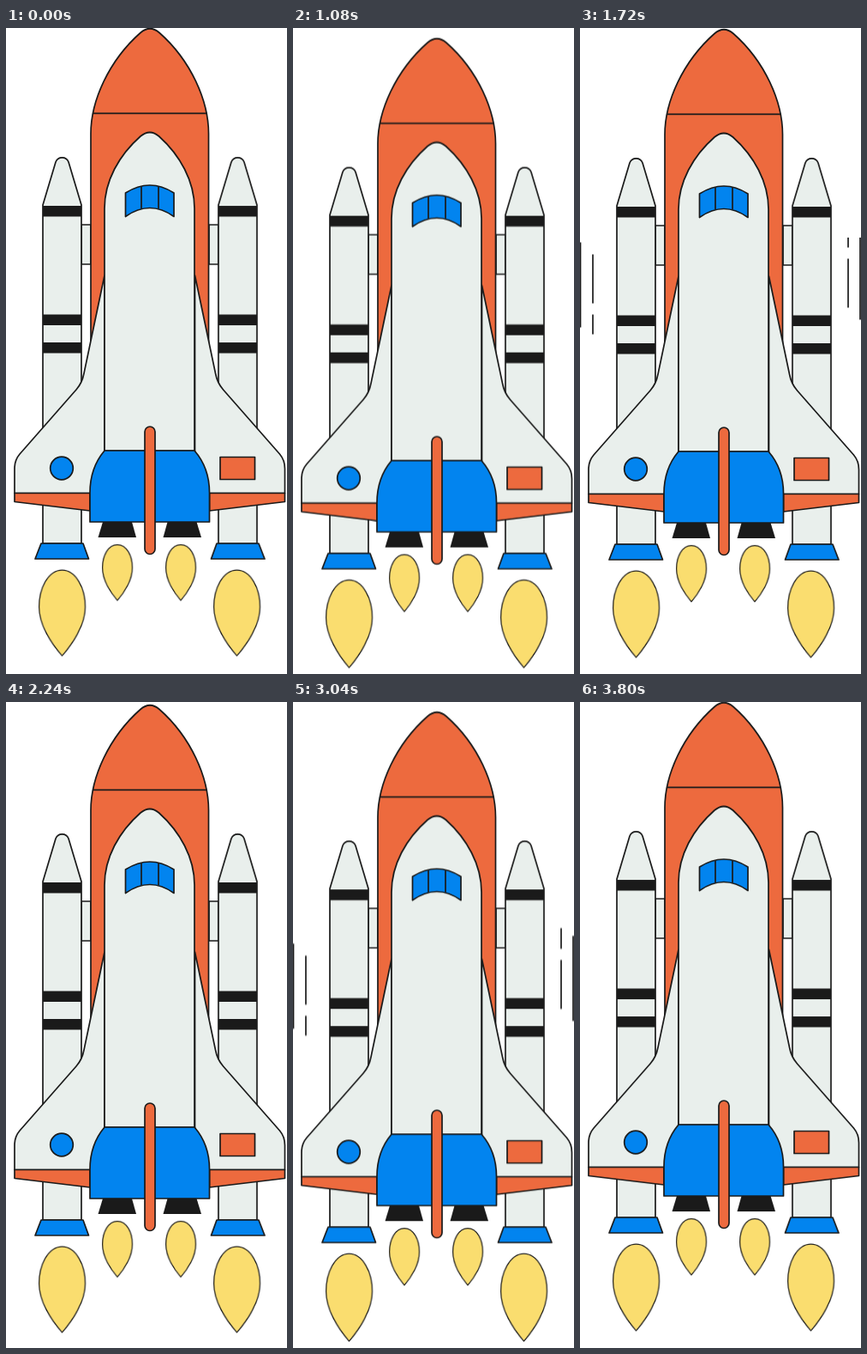
These frames come from a looping animation (328x752 px, 3840 ms). An HTML page without scripts:

```html
<!DOCTYPE html>
<html lang="en">
<head>
<meta charset="utf-8">
<title>Shuttle</title>
<style>
  html, body { margin: 0; width: 100%; height: 100%; overflow: hidden; background: #fff; }
  svg { display: block; width: 328px; height: 752px; }

  .shuttle { stroke: #1a1a1a; stroke-width: 1.7; stroke-linejoin: round; }
  .light { fill: #e9efec; }
  .orange { fill: #ed6a3e; }
  .blue { fill: #0284ef; }
  .dark { fill: #1a1a1a; }
  .flame { fill: #fadd6f; stroke-width: 1.2; }
  .line { fill: none; }

  .shuttle, .flame, .streaks { animation: bob 1920ms -8ms infinite; }
  .shuttle { animation-timing-function: ease-in-out; }
  .flame { animation: burn 48ms -8ms linear infinite alternate; }
  .big { transform-origin: 0 631px; }
  .small { transform-origin: 0 601.5px; }
  .streaks { animation: rush 1280ms -8ms infinite; }

  @keyframes bob { 50% { transform: translateY(12px); } }
  @keyframes burn { to { transform: scaleY(1.1); } }
  @keyframes rush {
    0% { transform: translateY(-290px); }
    25% { transform: translateY(-290px); animation-timing-function: cubic-bezier(.25, 1, .5, 1); }
    50% { transform: translateY(0); animation-timing-function: cubic-bezier(.5, 0, .75, 0); }
    75%, 100% { transform: translateY(220px); }
  }
</style>
</head>
<body>
<svg viewBox="0 0 328 752">
  <defs>
    <clipPath id="band"><rect y="243" width="328" height="172"/></clipPath>

    <g id="booster">
      <rect class="light" x="88" y="229" width="11" height="46"/>
      <path class="light" d="M43 600V206L58 156Q60 150.800 65.500 150.800T73 156L88 206V600Z"/>
      <path class="dark" stroke="none" d="M43 207H88V219.500H43ZM43 333.500H88V346H43ZM43 366H88V378.500H43Z"/>
      <path class="blue" d="M41 600H90L96.500 618H34Z"/>
    </g>

    <g id="wing">
      <path class="light" d="M115 288L91 402Q89 413 82 421L16 496Q10 503 10 513V541.500H115Z"/>
      <path class="orange" d="M10 541.500H98V562L10 551.500Z"/>
    </g>

    <path id="nozzle" class="dark" stroke="none" d="M113 575H147L152 593H107.500Z"/>
    <path id="big-flame" class="flame big" d="M65.500 631C82 631 92.500 652 92.500 672C92.500 692 78 713 65.500 726.500C53 713 38.500 692 38.500 672C38.500 652 49 631 65.500 631Z"/>
    <path id="small-flame" class="flame small" d="M130 601.500C141 601.500 147.500 614 147.500 627C147.500 641 138 655 130 663.500C122 655 112.500 641 112.500 627C112.500 614 119 601.500 130 601.500Z"/>
  </defs>

  <g class="shuttle">
    <g clip-path="url(#band)">
      <path class="streaks line" d="M.5 285.500v99M15 299.500v57m0 13v23M313 267.500v24m0 13v57M327 276.500v99"/>
    </g>

    <use href="#booster"/>
    <use href="#booster" transform="matrix(-1 0 0 1 336 0)"/>

    <path class="orange" d="M99 420V123C99 85 120 38 157 5.500Q168 -4 179 5.500C216 38 236.500 85 236.500 123V420Z"/>
    <path class="line" d="M101.500 99.300H234.500"/>

    <use href="#wing"/>
    <use href="#wing" transform="matrix(-1 0 0 1 335.500 0)"/>
    <circle class="blue" cx="65" cy="512.500" r="13.300"/>
    <rect class="orange" x="250" y="499.500" width="40.500" height="26"/>

    <path class="light" d="M115 492V210C115 178 132 148 157 126Q168 117 178.500 126C203 148 220 178 220 210V492Z"/>
    <path class="blue" d="M139.500 192Q168 174 196 192V219.500Q168 199.500 139.500 219.500Z"/>
    <path class="line" d="M158 184.500V210.500M178 184.500V210.500"/>

    <use href="#nozzle"/>
    <use href="#nozzle" transform="matrix(-1 0 0 1 335.500 0)"/>
    <path class="blue" d="M115 492H220Q237.500 512 237.500 541V575H98V541Q98 512 115 492Z"/>
    <rect class="orange" x="162" y="464" width="12" height="148.500" rx="6"/>

    <use href="#big-flame"/>
    <use href="#big-flame" x="204"/>
    <use href="#small-flame"/>
    <use href="#small-flame" x="74"/>
  </g>
</svg>
</body>
</html>
```
